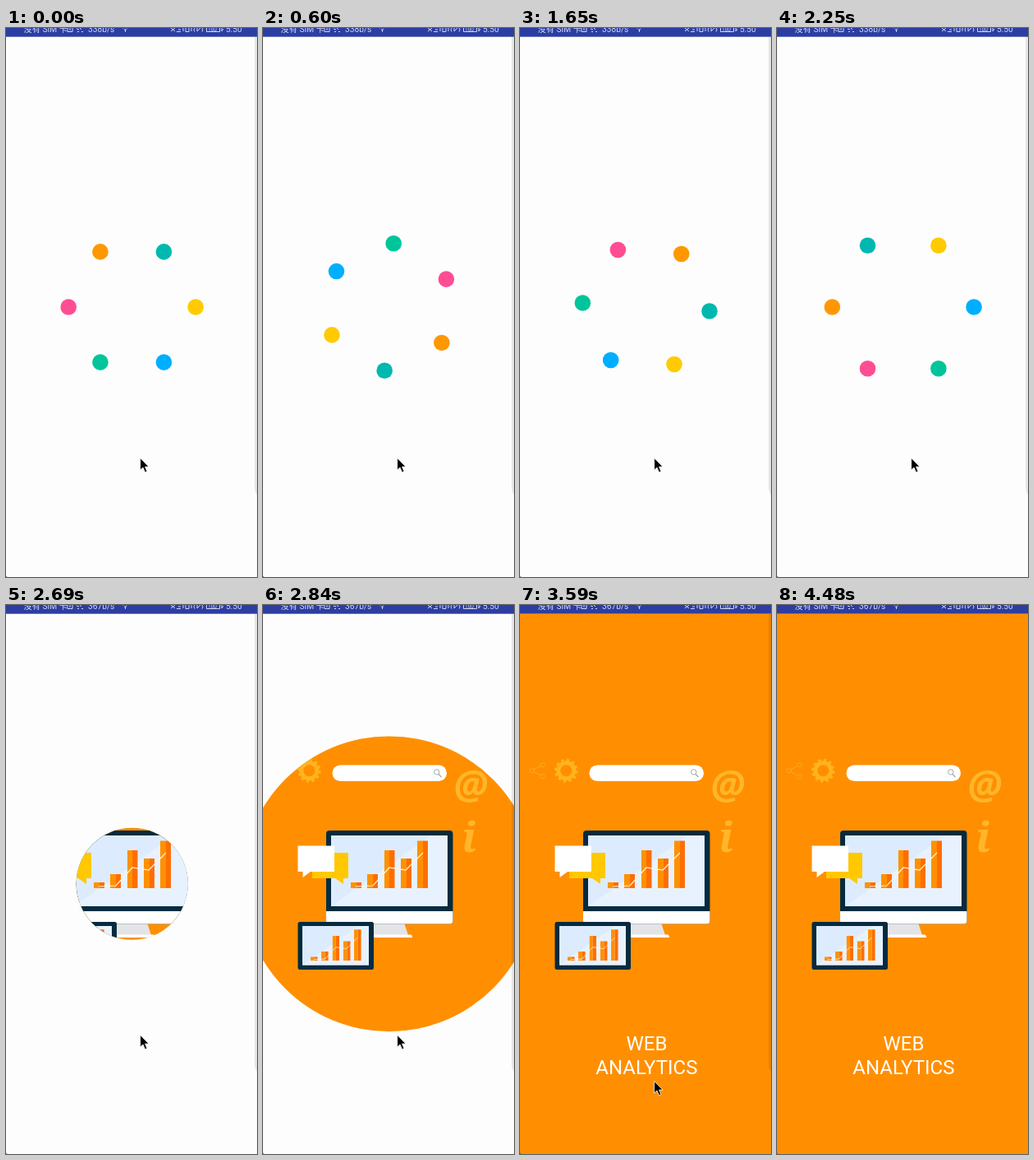
These frames come from a looping animation (306x667 px, 4630 ms). An HTML page:

```html
<!DOCTYPE html>
<html lang="en">
<head>
<meta charset="utf-8">
<title>Splash screen</title>
<style>
html, body { margin: 0; width: 100%; height: 100%; overflow: hidden; background: #fdfdfd; }
svg { display: block; }
.status { font: 10.2px Roboto, "Noto Sans CJK SC", "Noto Sans CJK", sans-serif; fill: #d3d7ef; }
.title { font: 24px Roboto, sans-serif; fill: #fff; text-anchor: middle; }
</style>
</head>
<body>
<svg width="306" height="667" viewBox="0 0 306 667">
  <defs>
    <clipPath id="clip"><circle id="hole" cx="153.7" cy="338.8" r="0"/></clipPath>
    <g id="chart">
      <path fill="#ff9100" d="M107 337h7v7h-7zM127 327h7v17h-7zM148 298h6v46h-6zM168 308h7v36h-7zM188 286.500h7v57.500h-7z"/>
      <path fill="#ff6d00" d="M114 337h6v7h-6zM134 327h6v17h-6zM154 298h6.500v46h-6.500zM175 308h6v36h-6zM195 286.500h6v57.500h-6z"/>
      <path fill="none" stroke="#fff3e0" stroke-width="1.200" d="M113 342L134 341 154 319 174 322 195 301"/>
    </g>
  </defs>
  <rect width="306" height="667" fill="#fdfdfd"/>
  <g id="dots"></g>

  <g clip-path="url(#clip)">
    <rect y="11" width="306" height="656" fill="#ff8f00"/>
    <g fill="none" stroke="#ffb31f">
      <g stroke="#ffa726">
        <path d="M25 195.500L17 200M17 202.500L25 207"/>
        <circle cx="14.500" cy="201.300" r="2.600"/>
        <circle cx="27.500" cy="194.300" r="2.600"/>
        <circle cx="27.500" cy="208.300" r="2.600"/>
      </g>
      <circle cx="56.300" cy="201.300" r="9.500" stroke-width="5"/>
      <circle cx="56.300" cy="201.300" r="12.800" stroke-width="3" stroke-dasharray="3.351"/>
    </g>
    <rect x="84.500" y="194.500" width="139.500" height="19.500" rx="9.750" fill="#fff"/>
    <g fill="none" stroke="#aaa">
      <circle cx="211.800" cy="203" r="3.200"/>
      <path stroke-width="1.400" d="M214 205.500l3.500 3.500"/>
    </g>
    <g fill="#ffb629" text-anchor="middle" font-weight="700" font-style="italic">
      <text x="253" y="236" font-family="Open Sans, sans-serif" font-size="48">@</text>
      <text x="251" y="299.500" font-family="Noto Serif, serif" font-size="50">i</text>
    </g>

    <path fill="#e4e4e6" d="M130 386H172L177 401H130z"/>
    <path fill="#fff" d="M130 400.500H180q2 0 2 3.500H130z"/>
    <rect x="77" y="274" width="154.500" height="113.500" rx="4" fill="#042b40"/>
    <path fill="#fff" d="M77 372H231.500V383.500a4 4 0 0 1-4 4H81a4 4 0 0 1-4-4z"/>
    <path fill="#dcecfe" d="M83 280h142v86H83z"/>
    <path fill="#e8f2ff" d="M83 366L205 280h20v86z"/>
    <use href="#chart"/>
    <path fill="#ffc800" d="M60 301h44v31h-6v7l-10-7H60z"/>
    <path fill="#fff" d="M42.500 292.500H87V324H58l-9.500 7V324h-6z"/>

    <rect x="42.500" y="385" width="92.500" height="58" rx="2.500" fill="#042b40"/>
    <path fill="#dcecfe" d="M48 390h81v47.500H48z"/>
    <path fill="#e8f2ff" d="M48 437.500L116 390h13v47.500z"/>
    <use href="#chart" transform="translate(-12.100 206.700) scale(.655)"/>

    <g class="title">
      <text x="154.400" y="541.200">WEB</text>
      <text x="154.400" y="569.700">ANALYTICS</text>
    </g>
  </g>

  <path id="edge" d="M306 11h-3V556q0 8 3 11z" fill-opacity=".09"/>
  <path d="M0 665q0 2 2 2H0z" fill="#555"/>
  <rect width="306" height="10.700" fill="#2d3ea3"/>
  <g class="status">
    <text x="21.500" y="4.800">没有 SIM 卡</text>
    <text id="speed" x="100" y="4.800"></text>
    <text x="268" y="4.500">5:50</text>
    <g fill="none" stroke="#d3d7ef">
      <path d="M75 0v4.500h6V0M78 0v3M86 1l3 1M90 0l2 2M87 4.500h2M92 4.500h2"/>
      <path d="M142 0q3-1.500 6 0M144 2h3M145.500 2v3"/>
      <path d="M201 4l5-4M201 0l5 4M208 4.500h5M210 2h3M216 0v4M219 0v4.500h4V0M226 0v4M230 0q-2 2 0 4.500M233 0v4l4-4M239 0q2 2 0 4.500"/>
      <path d="M244.500 0v4.500h16V0M263 0v4l2-3"/>
    </g>
    <text x="246" y="3.600" font-size="6.500">100</text>
  </g>
  <path id="cursor" stroke="#fff" stroke-width=".8" d="M163.700 522.500v14.500l3.300-3 2.500 5.800 2.500-1.100-2.400-5.600h4.500z"/>
</svg>
<script>
const LOOP = 4630, CX = 153.7, CY = 339, RADIUS = 77.5, DOT = 9.8;
const SPIN = 0.2568; // degrees per ms
const MERGE = 1765, MERGE_MS = 703, EXPAND = 2509, EXPAND_MS = 684;
const COLORS = ['#ff9800', '#00b8af', '#ffcb00', '#00aeff', '#00c59a', '#ff4d93'];

const $ = id => document.getElementById(id);
const clamp = x => Math.max(0, Math.min(1, x));
const dots = COLORS.map(fill => {
  const dot = document.createElementNS('http://www.w3.org/2000/svg', 'circle');
  dot.setAttribute('fill', fill);
  dot.setAttribute('r', DOT);
  return $('dots').appendChild(dot);
});
const show = (id, on) => { $(id).style.display = on ? '' : 'none'; };

// The picture is held for about 150 ms at a time.
function hold(t) {
  const shift = (t >= 2540) * 10 + (t >= 4330) * 10;
  return Math.floor((t + shift) / 150) * 150 - shift;
}

function draw(t) {
  // Spin, then swell and collapse like a reversed overshoot.
  const m = clamp((t - MERGE) / MERGE_MS);
  const radius = RADIUS * (1 + 3 * m * m - 4 * m ** 3);
  const turn = t < MERGE ? 240 + t * SPIN : 180;
  dots.forEach((dot, i) => {
    const a = (turn + i * 60) * Math.PI / 180;
    dot.setAttribute('cx', CX + radius * Math.cos(a));
    dot.setAttribute('cy', CY + radius * Math.sin(a));
  });
  show('dots', t < EXPAND);

  const e = clamp((t - EXPAND) / EXPAND_MS);
  const size = DOT + (367 - DOT) * (1 - Math.cos(Math.PI * e)) / 2;
  $('hole').setAttribute('r', t < EXPAND ? 0 : size);

  const away = clamp((t - 3290) / 750);
  $('cursor').setAttribute('transform', `translate(0 ${140 * away})`);
  show('cursor', away < 1);
  show('edge', t < 4330);
  $('speed').textContent = t < 2540 ? '338b/s' : '367b/s';
}

const start = performance.now();
function tick() {
  draw(hold((performance.now() - start) % LOOP));
  requestAnimationFrame(tick);
}
tick();
</script>
</body>
</html>
```
